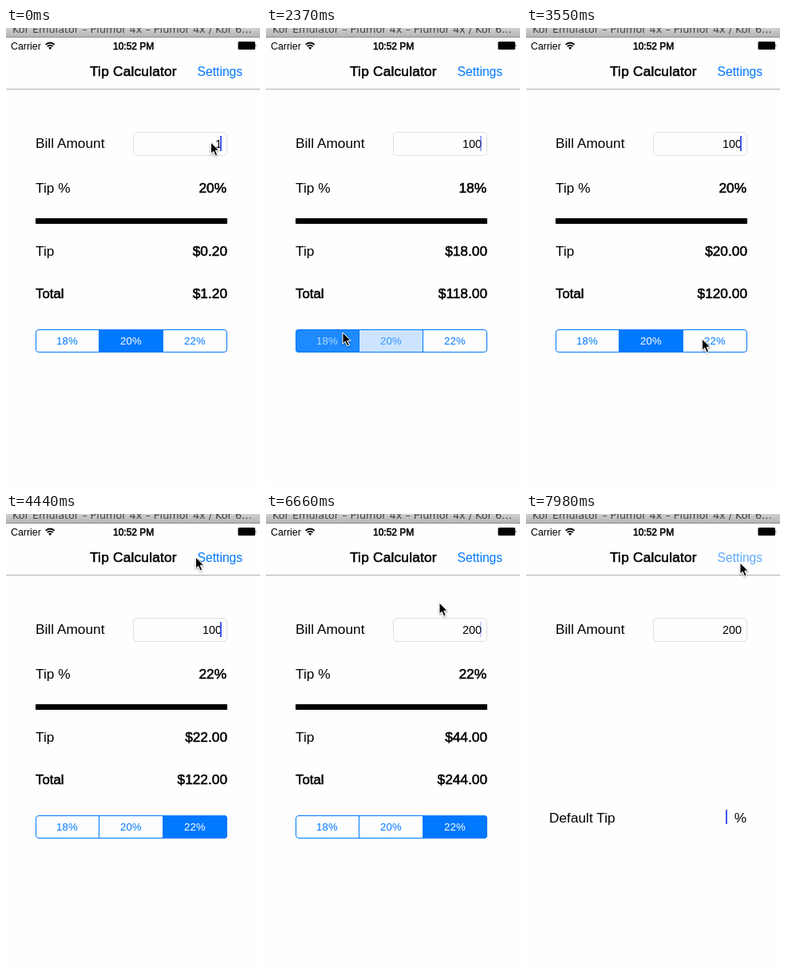
Recreate the animation shown at these times as an HTML page. Size 318 by 573 pixels, loop 8 s.

```html
<!DOCTYPE html>
<html lang="en">
<head>
<meta charset="utf-8">
<title>Tip Calculator</title>
<style>
html, body { margin: 0; width: 100%; height: 100%; overflow: hidden; background: #fefefe; }
svg { display: block; width: 318px; height: 573px; font: 17.3px "Liberation Sans", Arial, sans-serif; }
.mid { stroke: #000; stroke-width: .55px; }
.end { text-anchor: end; }
.seg { font-size: 13.2px; letter-spacing: .2px; text-anchor: middle; }
.blue { fill: #0078ff; }
.caret { fill: #4257e6; }
</style>
</head>
<body>
<svg viewBox="0 0 318 573">
  <defs>
    <linearGradient id="bar" x2="0" y2="1">
      <stop offset="0" stop-color="#cfcfcf"/>
      <stop offset="1" stop-color="#b6b6b6"/>
    </linearGradient>
    <clipPath id="round"><rect x="37" y="377" width="240" height="29" rx="4"/></clipPath>
    <filter id="shade" x="-50%" y="-50%" width="200%" height="200%">
      <feDropShadow dx="0" dy="1.2" stdDeviation="1" flood-opacity=".4"/>
    </filter>
  </defs>

  <rect width="318" height="573" fill="#fefefe"/>
  <rect width="318" height="11" fill="url(#bar)"/>
  <rect y="11" width="318" height="1" fill="#8f8f8f"/>
  <text x="8" y="6" fill="#444" style="font:12.8px 'DejaVu Sans',sans-serif">Kor Emulator – Plumor 4x – Plumor 4x / Kor 6…</text>

  <text x="6" y="26.5" font-size="12.4">Carrier</text>
  <path fill="none" stroke="#000" stroke-width="1.9" d="M49.7 20.9A7.6 7.6 0 0 1 60.7 20.9M51.8 23.1A4.7 4.7 0 0 1 58.6 23.1"/>
  <path d="M55.2 27L53.2 24.8A2.9 2.9 0 0 1 57.2 24.8Z"/>
  <text class="mid" x="134" y="26.5" font-size="12">10:52 PM</text>
  <rect x="290.5" y="17" width="21.5" height="10" rx="1.5"/>
  <path d="M312.6 20.3q1.8 1.7 0 3.4z"/>

  <text class="mid" x="105" y="60" letter-spacing=".2">Tip Calculator</text>
  <text class="blue" id="settings" x="239.5" y="60" font-size="15.7">Settings</text>
  <rect y="76" width="318" height="1" fill="#b2b2b2"/>

  <text x="37" y="150">Bill Amount</text>
  <rect x="159.5" y="130.5" width="117" height="29" rx="5" fill="#fefefe" stroke="#dedede"/>
  <text class="end" id="bill" x="270" y="150" font-size="14.4"></text>
  <rect class="caret" id="caret" x="268" y="135" width="2" height="19"/>

  <g id="main">
    <text x="37" y="206">Tip %</text>
    <text class="mid end" id="pct" x="276" y="206"></text>
    <rect x="37" y="238" width="240" height="7"/>
    <text x="37" y="285">Tip</text>
    <text class="mid end" id="tip" x="277" y="285"></text>
    <text class="mid" x="37" y="338" font-size="16.8">Total</text>
    <text class="mid end" id="total" x="277" y="338"></text>
    <g id="segs" clip-path="url(#round)"></g>
    <path d="M116.5 378V405M196.5 378V405" stroke="#0078ff"/>
    <rect x="37.5" y="377.5" width="239" height="28" rx="3.5" fill="none" stroke="#0078ff"/>
  </g>

  <g id="prefs">
    <text x="29" y="385.5">Default Tip</text>
    <rect class="caret" x="250" y="370" width="2" height="18"/>
    <text class="end" x="276" y="385.5">%</text>
  </g>

  <path id="arrow" filter="url(#shade)" stroke="#fff" d="M0 0V14.2L3.2 11.2L5.6 16.8L8.2 15.7L5.8 10.2H10.2Z"/>
</svg>
<script>
const LOOP = 8000, TICK = 148;   // the screen refreshes once per tick
const $ = id => document.getElementById(id);
const clamp = (v, lo, hi) => Math.min(hi, Math.max(lo, v));

// field content after each key press: [tick, text]
const keys = [[0, "1"], [2, "100"], [32, "10"], [34, "1"], [35, ""], [39, "2"], [40, "20"], [41, "200"]];

// pointer moves: [first tick, last tick, x, y]
const moves = [
  [0, 0, 256.5, 143], [6, 9, 240, 304], [9, 14, 96, 381], [17, 20, 150, 387],
  [22, 24, 220.5, 389], [27, 30, 237.5, 54], [43, 45, 217, 111], [45, 47, 211, 155], [47, 52, 268, 61]
];

// segments are clicked left to right, at an even pace
const FIRST_CLICK = 16, CLICK_GAP = 5;

function choice(k) {
  const since = k - FIRST_CLICK;
  if (since < 0) return { now: 1, fading: false };
  const now = Math.min(2, Math.floor(since / CLICK_GAP));
  return { now, before: now ? now - 1 : 1, fading: since === now * CLICK_GAP };
}

function pointer(k) {
  let x = 0, y = 0;
  for (const [from, to, toX, toY] of moves) {
    if (k < from) break;
    const p = to > from ? clamp((k - from) / (to - from), 0, 1) : 1;
    x += (toX - x) * p;
    y += (toY - y) * p;
  }
  return `translate(${x} ${y})`;
}

// solid after a key press, then dips once a second
function caretAlpha(idle) {
  if (idle < 500) return 1;
  const fromDip = Math.abs((idle + 680) % 1000 - 500);
  return clamp((fromDip - 200) / 100, 0, 1);
}

const segs = [0, 1, 2].map(i => {
  const add = (tag, attrs) => {
    const el = document.createElementNS("http://www.w3.org/2000/svg", tag);
    for (const name in attrs) el.setAttribute(name, attrs[name]);
    return $("segs").appendChild(el);
  };
  const box = add("rect", { x: 36 + 80 * i, y: 377, width: 81, height: 29 });
  const label = add("text", { x: 76.5 + 80 * i, y: 396, class: "seg" });
  label.textContent = 18 + 2 * i + "%";
  return { box, label };
});

function draw(time) {
  const k = Math.floor((time + 12) / TICK);
  const [pressed, text] = keys.filter(key => key[0] <= k).pop();
  const { now, before, fading } = choice(k);
  const rate = 18 + 2 * now, bill = Number(text), tip = bill * rate / 100;

  $("bill").textContent = text;
  $("pct").textContent = rate + "%";
  $("tip").textContent = "$" + tip.toFixed(2);
  $("total").textContent = "$" + (bill + tip).toFixed(2);

  segs.forEach(({ box, label }, i) => {
    const [fill, ink] =
      i === now ? (fading ? ["#1e8aff", "#b5d9ff"] : ["#0078ff", "#fff"]) :
      fading && i === before ? ["#cce4ff", "#3396ff"] : ["#fefefe", "#0078ff"];
    box.setAttribute("fill", fill);
    label.setAttribute("fill", ink);
  });

  const prefs = k >= 54;
  $("main").style.display = prefs ? "none" : "";
  $("prefs").style.display = prefs ? "" : "none";
  $("settings").style.opacity = k >= 53 ? 0.62 : 1;
  $("caret").style.opacity = prefs ? 0 : caretAlpha((k - pressed) * TICK);

  // the pointer hides while the first digits are typed
  $("arrow").style.display = k >= 2 && k < 6 ? "none" : "";
  $("arrow").setAttribute("transform", pointer(k));
}

function run() {
  draw(performance.now() % LOOP);
  requestAnimationFrame(run);
}
run();
</script>
</body>
</html>
```
